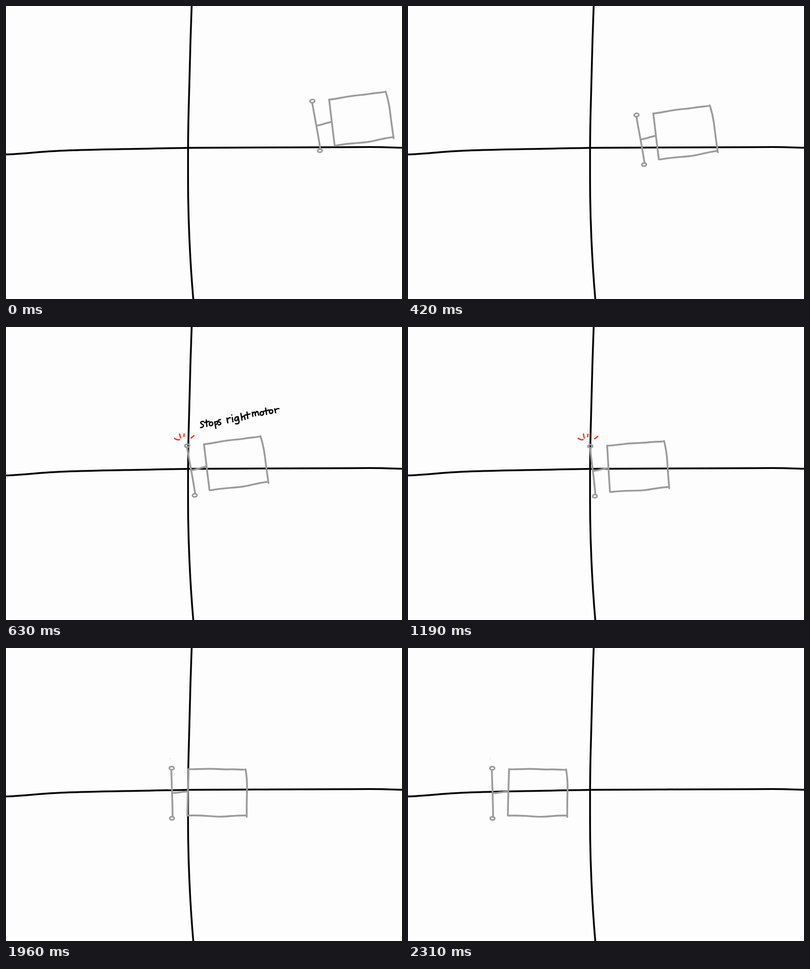
Write an HTML page that moves like this. It is 870 px wide and 644 px high and loops after 2.38 s.

```html
<!DOCTYPE html>
<html lang="en">
<head>
<meta charset="utf-8">
<title>Line follower</title>
<style>
  html, body { margin: 0; width: 100%; height: 100%; overflow: hidden; background: #fdfdfd; }
  svg { display: block; width: 100%; height: 100%; }
  path, ellipse { fill: none; stroke-linecap: round; stroke-linejoin: round; }
  .axis { stroke: #050505; stroke-width: 4; }
  .cart { stroke: #9b9b9b; stroke-width: 3.9; }
  .spark { stroke: #f93a28; stroke-width: 3; }
  .low { stroke: #e8260f; }
  .note { stroke: #080808; stroke-width: 2.9; }
</style>
</head>
<body>
<svg viewBox="0 0 870 644">
  <g class="axis">
    <path d="M-3 326.3C30 326 70 320 130 317.8C200 315 300 314 400 311.8C530 311 700 310.3 800 310C830 310 850 311 873 311.7"/>
    <path d="M408 -3C405 80 402 180 401 240C399.5 300 399.8 360 400.2 420C401.5 500 405 570 411.7 647"/>
  </g>

  <!-- Origin: centre of the upper sensor -->
  <g id="cart" class="cart">
    <ellipse rx="5.2" ry="3.5" stroke-width="3.5"/>
    <ellipse cx=".6" cy="110.3" rx="5" ry="3.5" stroke-width="3.5"/>
    <path d="M-.8 5C0 35 1.8 70 2 106"/>
    <path d="M3.5 54.5C12 55 20 52 34 51.5"/>
    <path d="M37 2.2C36 30 35 70 34.3 104"/>
    <path d="M37 2.2C50 3 65 1.5 85 1.5C105 1.7 115 3.3 130 2.6C140 2.3 150 3.6 159 3.4"/>
    <path d="M162.3 2.4C164.5 15 166 32 165.5 48C165 65 164.7 85 164.8 107"/>
    <path d="M36.3 104.3C65 103 85 106.5 108 106.7C132 106 138 103.5 164 104.2"/>
    <g id="top" class="spark">
      <path d="M-25 -19.8C-22 -17 -19 -15 -14.7 -15.8"/>
      <path d="M-12.6 -28C-12.5 -24 -12 -21 -11.6 -19.2"/>
      <path d="M-2.8 -26.5L-4 -21.5"/>
      <path d="M18 -20L11 -15.4"/>
    </g>
    <circle id="speck" cx="-4" cy="-20.7" r=".7" fill="#f08a80" stroke="none"/>
  </g>

  <g id="low" class="spark low">
    <path d="M386 388.5L380 394"/>
    <path d="M394.2 393.5L391.3 400.5"/>
    <path d="M409.8 391.5L413 397"/>
    <path d="M421.5 389.5L426.5 393.5"/>
  </g>

  <g id="note" class="note" role="img" aria-label="Stops right motor">
    <path d="M434 207.5C427 207 426 212 431 213.5C436 215.5 434 221 427.5 221"/>
    <path d="M440 204.5L441.3 218.5M436 210L446 207.5"/>
    <path d="M450 209C445 210 446 218 451 217C456 215 455 208 450 209"/>
    <path d="M458.5 208.5L461 222.5M459 209.5C466 204 467.5 213 460.5 214.5"/>
    <path d="M471 203.5C465 204 465 208 469 209C474 211 472 215.5 466.5 215"/>

    <path d="M485.3 200.5L487.3 210.5M486 205Q488 199 492.5 199.5"/>
    <path d="M497 199L498.6 208.3M496 193.4V193.6"/>
    <path d="M510 197.5C503 195.5 500 206 505.5 206C509 205 510 201 510 197.5L512 208.5Q511.5 214 504.5 212.5"/>
    <path d="M516 190L518.5 204.5M517.7 200Q522.5 193 524 197.5L525.3 203"/>
    <path d="M529.3 187L531.3 201M524.5 194L536 191.2"/>

    <path d="M541 187.5L542.3 196.3M541.7 191Q545.5 184 547 189L548.3 195M547.5 190Q552 182.5 553.5 188L555.3 193.7"/>
    <path d="M562 186C556.5 187 558 195 562.7 194C567.5 192 566.5 185 562 186"/>
    <path d="M570.3 178.5L572.5 192M566 185.3L578 182.5"/>
    <path d="M582 182C577 183 578 191 583 190C587.5 188 586.5 181 582 182"/>
    <path d="M590.3 180L592.3 188.5M591.2 184Q593.5 178.5 599.5 179.5"/>
  </g>
</svg>
<script>
const TICK = 70, TICKS = 34;

// tick, x, y, angle
const poses = [
  [0, 673, 209, -8.4],
  [4, 536.2, 233.2, -8.4],
  [5, 536.2, 233.2, -8.4],
  [6, 502, 239.5, -8.4],
  [9, 398, 261, -8.4],
  [16, 398, 261, -8.4],
  [17, 400.5, 262, -5],
  [20, 398.5, 261, 0.2],
  [27, 398.5, 261, 0.2],
  [28, 364, 264, 0],
  [33, 185, 264.2, 0]
];

const $ = id => document.getElementById(id);
const cart = $("cart");
const show = (id, on) => $(id).setAttribute("visibility", on ? "visible" : "hidden");

function poseAt(tick) {
  const i = Math.max(1, poses.findIndex(p => p[0] >= tick));
  const a = poses[i - 1], b = poses[i];
  const k = (tick - a[0]) / (b[0] - a[0]);
  return a.map((v, j) => v + (b[j] - v) * k);
}

function draw(now) {
  const tick = Math.floor(now / TICK) % TICKS;
  const [, x, y, angle] = poseAt(tick);
  cart.setAttribute("transform", `translate(${x} ${y}) rotate(${angle})`);
  show("top", tick >= 9 && tick < 28);
  show("note", tick >= 9 && tick < 17);
  show("low", tick >= 20 && tick < 28);
  show("speck", tick >= 28);
}

const start = performance.now();
function loop() {
  draw(performance.now() - start);
  requestAnimationFrame(loop);
}
loop();
</script>
</body>
</html>
```
